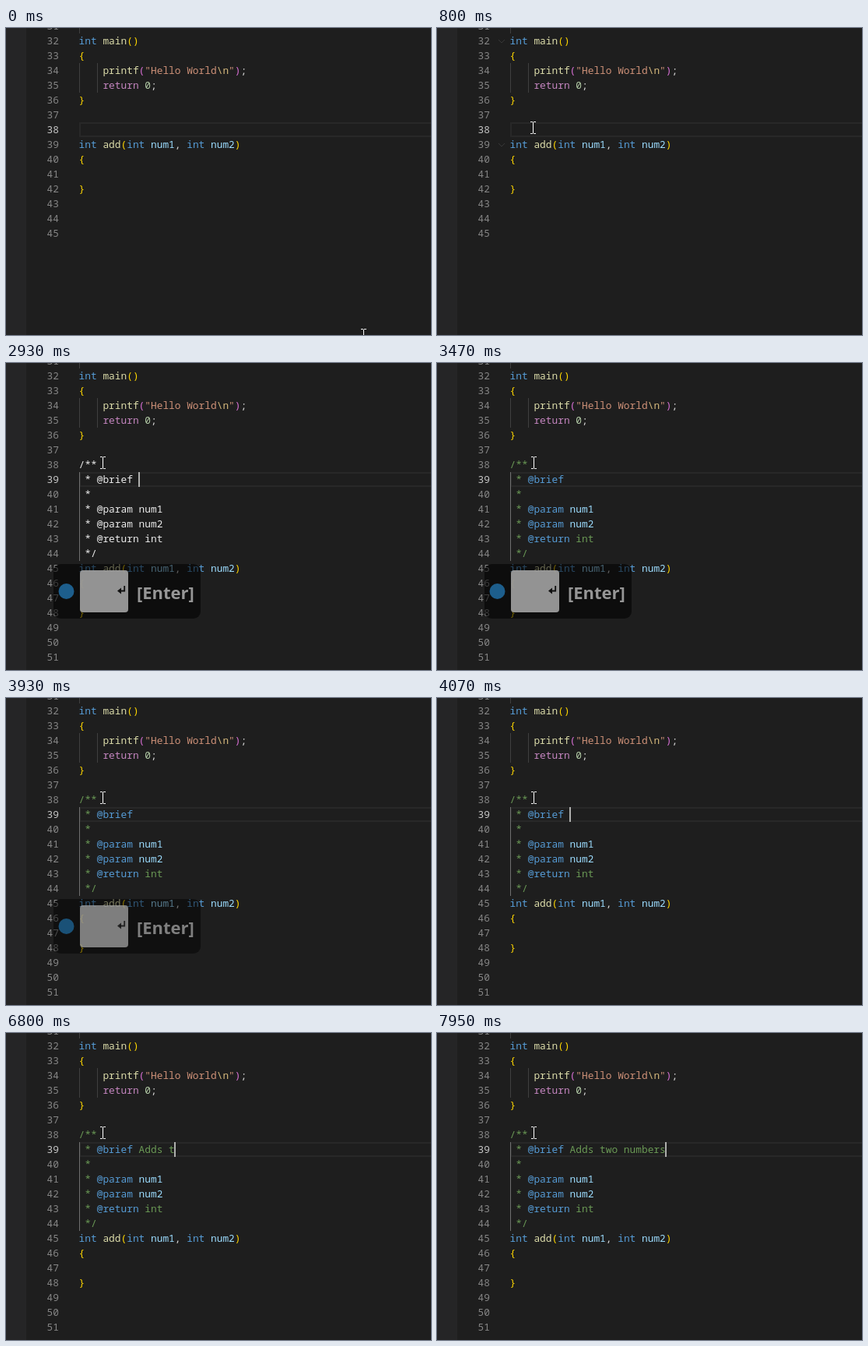
An HTML page with a canvas that plays this animation: 546 by 394 pixels, repeating every 8000 ms.

```html
<!DOCTYPE html>
<html lang="en">
<head>
<meta charset="utf-8">
<title>Doc comment typing</title>
<style>
  html, body { margin: 0; width: 100%; height: 100%; overflow: hidden; background: #1e1e1e; }
  canvas { display: block; }
</style>
</head>
<body>
<canvas id="stage" width="546" height="394"></canvas>
<script>
const ctx = document.getElementById('stage').getContext('2d');
const LOOP = 8000, TICK = 1000 / 15;
const CHAR = 7.7, LINE = 19, LEFT = 93.6;
const CODE_FONT = '12.833px "Noto Sans Mono", "DejaVu Sans Mono", monospace';

// Each token starts with its colour key; tokens are separated by "|".
const COLORS = {
  k: '#569cd6', f: '#dcdcaa', v: '#9cdcfe', b: '#ffd700', p: '#da70d6', s: '#ce9178',
  e: '#d7ba7d', r: '#c586c0', n: '#b5cea8', c: '#6a9955', t: '#d4d4d4', u: '#ececec'
};
const MAIN = [
  'kint |fmain|b()',
  'b{',
  't    |fprintf|p(|s"Hello World|e\\n|s"|p)|t;',
  't    |rreturn |n0|t;',
  'b}'
];
const ADD = ['kint |fadd|b(|kint |vnum1|t, |kint |vnum2|b)', 'b{', '', 'b}'];
const DOC = ['c/**', 'c * |k@brief ', 'c *', 'c * |k@param |vnum1', 'c * |k@param |vnum2', 'c * |k@return |cint', 'c */'];
const SUMMARY = 'Adds two numbers';

// Ticks at which the caret toggles and at which each summary letter appears.
const BLINKS = [15, 22, 27, 41, 44, 52, 60, 67, 74, 82, 89];
const KEYS = [90, 93, 96, 98, 99, 102, 103, 104, 104, 108, 109, 112, 115, 115, 117, 119];
// Mouse stops: tick, x, y
const MOUSE = [[0, 459.5, 394], [9, 91, 139], [12, 123.5, 128], [13, 123.5, 128], [14, 131, 123], [17, 124.5, 128]];

const passed = (list, k) => list.filter(v => k >= v).length;
const clamp = v => Math.max(0, Math.min(1, v));
const lineTop = n => 7 + LINE * (n - 32);

function rect(color, x, y, w, h, r = 0) {
  ctx.fillStyle = color;
  ctx.beginPath();
  ctx.roundRect(x, y, w, h, r);
  ctx.fill();
}

function polyline(color, width, ...points) {
  ctx.strokeStyle = color;
  ctx.lineWidth = width;
  ctx.beginPath();
  points.forEach(([x, y]) => ctx.lineTo(x, y));
  ctx.stroke();
}

function write(str, x, y, color) {
  ctx.fillStyle = color;
  ctx.fillText(str, x, y);
}

function codeLine(n, src, only) {
  let col = 0;
  for (const token of src.split('|')) {
    const str = token.slice(1);
    write(str, LEFT + col * CHAR, lineTop(n) + 14, COLORS[only || token[0]]);
    col += str.length;
  }
}

const block = (first, lines, only) => lines.forEach((src, i) => codeLine(first + i, src, only));

function openingComment(k) {
  if (k < 27) return '';
  if (k < 31) return 't/';
  return k < 33 ? 'c/*' : 'c/** */';
}

function caretColumn(k, expanded) {
  return expanded ? 10 + passed(KEYS, k) : passed([27, 31, 33], k);
}

function drawMouse(k) {
  let i = 0;
  while (i < MOUSE.length - 2 && k > MOUSE[i + 1][0]) i++;
  const [k0, x0, y0] = MOUSE[i], [k1, x1, y1] = MOUSE[i + 1];
  const u = clamp((k - k0) / (k1 - k0)), ease = u * u * (3 - 2 * u);
  const x = Math.round(x0 + (x1 - x0) * ease - 0.5);
  const y = Math.round(y0 + (y1 - y0) * ease);
  rect('#fff', x, y - 7, 1, 14);
  for (const edge of [y - 8, y + 7]) {
    rect('#fff', x - 3, edge, 3, 1);
    rect('#fff', x + 1, edge, 3, 1);
  }
}

function drawChevrons(k) {
  ctx.globalAlpha = 0.25 * clamp(Math.min((k - 7) / 3, (15 - k) / 5));
  for (const n of [32, 39]) {
    const y = lineTop(n) + 8;
    polyline('#c5c5c5', 1, [79, y], [83, y + 4], [87, y]);
  }
  ctx.globalAlpha = 1;
}

function drawKeyPanel(k) {
  if (k < 44 || k >= 61) return;
  ctx.globalAlpha = clamp((61 - k) / 2.4);
  rect('rgba(0,0,0,.55)', 61, 258, 189, 70, 9);
  ctx.fillStyle = '#1d5e8c';
  ctx.beginPath();
  ctx.arc(77.5, 293, 10, 0, 7);
  ctx.fill();
  rect('rgba(158,158,158,.93)', 95, 266, 62, 54, 4);
  polyline('#111', 1.8, [152.2, 286], [152.2, 292.5], [146, 292.5]);
  ctx.fillStyle = '#111';
  ctx.beginPath();
  ctx.moveTo(143, 292.5);
  ctx.lineTo(148, 288.5);
  ctx.lineTo(148, 296.5);
  ctx.fill();
  ctx.font = 'bold 22px "Open Sans", sans-serif';
  write('[Enter]', 168, 303, '#969696');
  ctx.globalAlpha = 1;
}

function draw(k) {
  const expanded = k >= 44, active = expanded ? 39 : 38;
  rect('#1e1e1e', 0, 0, 546, 394);
  rect('#252526', 0, 0, 26, 394);
  ctx.strokeStyle = '#282828';
  ctx.lineWidth = 2;
  ctx.strokeRect(95, lineTop(active) + 1, 460, LINE - 2);

  rect('#404040', 94, 0, 1, 7);
  rect('#404040', 94, lineTop(34), 1, 2 * LINE);
  rect('#404040', 117, lineTop(34), 1, 2 * LINE);
  if (expanded) rect('#707070', 94, lineTop(39), 1, 6 * LINE);

  ctx.font = CODE_FONT;
  for (let n = 31; n <= (expanded ? 51 : 45); n++)
    write(n, 52.6, lineTop(n) + 14, n === active ? '#c6c6c6' : '#858585');

  block(32, MAIN);
  if (expanded) {
    block(38, DOC, k < 45 && 'u');
    write(SUMMARY.slice(0, passed(KEYS, k)), LEFT + 10 * CHAR, lineTop(39) + 14, COLORS.c);
    block(45, ADD);
  } else {
    codeLine(38, openingComment(k));
    block(39, ADD, k === 32 && 'c');
  }

  if (passed(BLINKS, k) % 2) {
    const x = Math.floor(LEFT + caretColumn(k, expanded) * CHAR);
    rect('#aeafad', Math.max(94, x), lineTop(active), 2, LINE);
  }
  drawChevrons(k);
  drawKeyPanel(k);
  drawMouse(k);
}

const begin = performance.now();
function tick() {
  const t = (performance.now() - begin) % LOOP;
  draw(Math.min(119, Math.floor((t + 4) / TICK)));
  requestAnimationFrame(tick);
}
tick();
</script>
</body>
</html>
```
